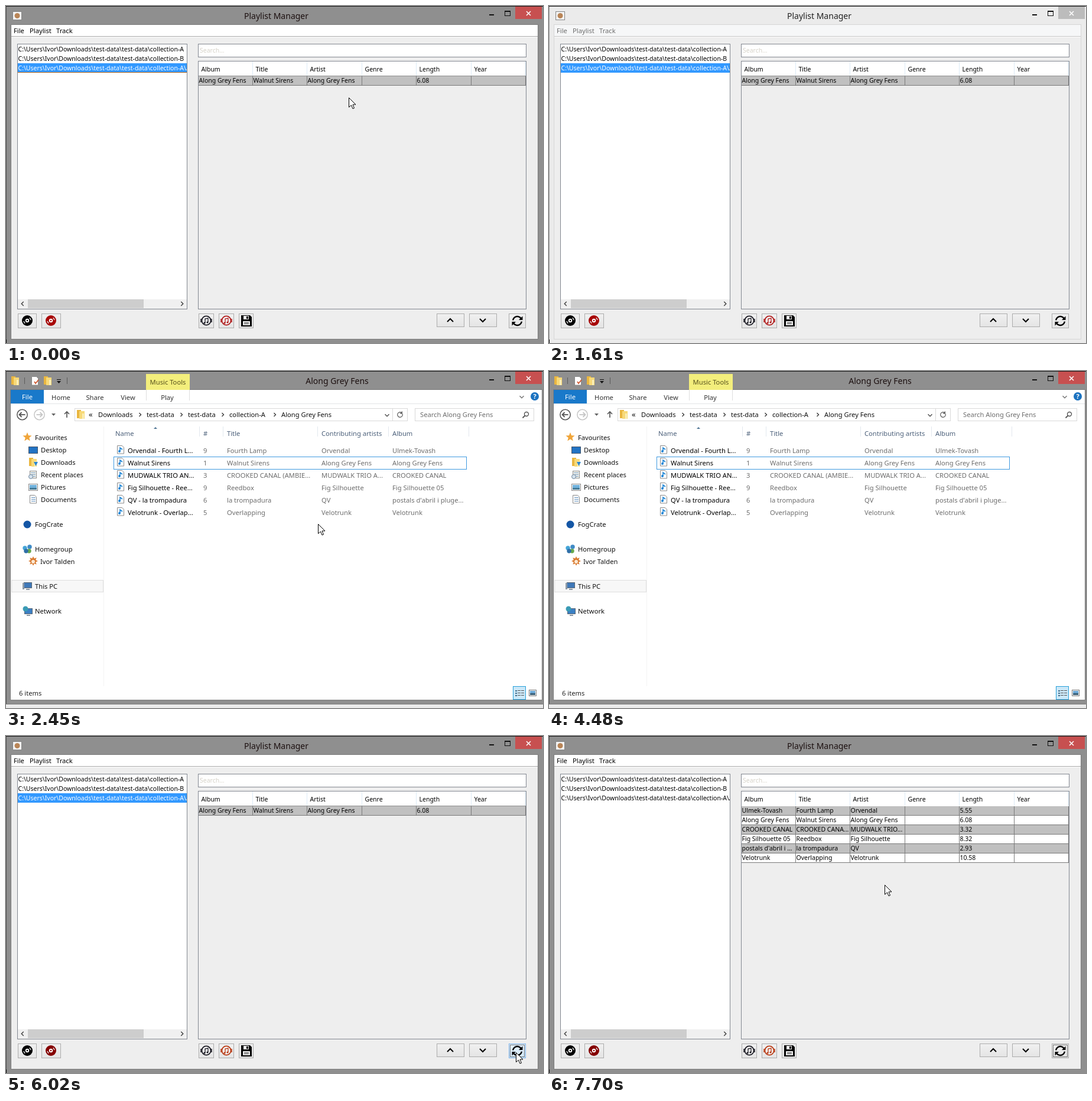
Animation, 909 px wide and 571 px high, one loop 7770 ms. Source, as an HTML page with a canvas:

```html
<!DOCTYPE html>
<html lang="en">
<head>
<meta charset="utf-8">
<title>Playlist Manager</title>
<style>
html, body { margin: 0; width: 100%; height: 100%; overflow: hidden; background: #8f8f8f; }
canvas { display: block; }
</style>
</head>
<body>
<canvas id="stage" width="909" height="571"></canvas>
<script>
const ctx = document.getElementById('stage').getContext('2d');
const LOOP = 7770, STEP = 70;
const SANS = '"Noto Sans", "Open Sans", sans-serif';
const SMALL = '10.5px ' + SANS, UI = '11.2px ' + SANS, TITLE = '14px ' + SANS;

const FOLDER = 'Along Grey Fens';
const TRACKS = [
  { file: 'Orvendal - Fourth Lamp', no: 9, title: 'Fourth Lamp', artist: 'Orvendal', album: 'Ulmek-Tovash', length: '5.55' },
  { file: 'Walnut Sirens', no: 1, title: 'Walnut Sirens', artist: FOLDER, album: FOLDER, length: '6.08' },
  { file: 'MUDWALK TRIO AND GUESTS', no: 3, title: 'CROOKED CANAL (AMBIENT SIDE)', artist: 'MUDWALK TRIO AND GUESTS', album: 'CROOKED CANAL', length: '3.32' },
  { file: 'Fig Silhouette - Reedbox', no: 9, title: 'Reedbox', artist: 'Fig Silhouette', album: 'Fig Silhouette 05', length: '8.32' },
  { file: 'QV - la trompadura', no: 6, title: 'la trompadura', artist: 'QV', album: "postals d'abril i pluges de tardor", length: '2.93' },
  { file: 'Velotrunk - Overlapping', no: 5, title: 'Overlapping', artist: 'Velotrunk', album: 'Velotrunk', length: '10.58' }
];

// Each run: pointer keys [time, x, y], visible until `end`.
const POINTER = [
  { end: 700, keys: [[0, 580, 155], [490, 580, 155], [560, 604, 163], [630, 672, 196]] },
  { end: 3080, keys: [[1890, 655, 358], [1960, 606, 322], [2030, 564, 290], [2100, 538, 268], [2170, 528, 259], [2870, 528, 259], [2940, 556, 260], [3010, 629, 263]] },
  { end: LOOP, keys: [[4900, 902, 380], [5110, 868, 444], [5320, 842, 508], [5530, 863, 536], [6510, 863, 536], [6580, 857, 528],
    [6720, 831, 487], [6930, 742, 420], [7140, 640, 350], [7350, 569, 307], [7560, 569, 268], [7700, 568, 252]] }
];

function rect(x, y, w, h, fill, stroke) {
  if (fill) { ctx.fillStyle = fill; ctx.fillRect(x, y, w, h); }
  if (stroke) { ctx.strokeStyle = stroke; ctx.lineWidth = 1; ctx.strokeRect(x + .5, y + .5, w - 1, h - 1); }
}
function line(points, color, width = 1) {
  ctx.beginPath();
  points.forEach(([x, y]) => ctx.lineTo(x, y));
  ctx.strokeStyle = color; ctx.lineWidth = width; ctx.stroke();
}
function poly(points, fill, stroke) {
  ctx.beginPath();
  points.forEach(([x, y]) => ctx.lineTo(x, y));
  ctx.closePath();
  if (fill) { ctx.fillStyle = fill; ctx.fill(); }
  if (stroke) { ctx.strokeStyle = stroke; ctx.lineWidth = 1; ctx.stroke(); }
}
function circle(x, y, r, fill, stroke, width = 1) {
  ctx.beginPath(); ctx.arc(x, y, r, 0, 7);
  if (fill) { ctx.fillStyle = fill; ctx.fill(); }
  if (stroke) { ctx.strokeStyle = stroke; ctx.lineWidth = width; ctx.stroke(); }
}
function text(str, x, y, color = '#000', font = UI, align = 'left') {
  ctx.font = font; ctx.fillStyle = color; ctx.textAlign = align;
  ctx.fillText(str, x, y);
}
function fitted(str, x, y, width, color, font) {
  ctx.font = font;
  let s = str;
  for (let n = str.length; ctx.measureText(s).width > width; n--) s = str.slice(0, n - 1) + '...';
  text(s, x, y, color, font);
}
// dir: 'l', 'r', 'u' or 'd'
function chevron(x, y, size, dir, color, width = 1.5) {
  const h = size / 2, s = dir === 'l' || dir === 'u' ? 1 : -1;
  const side = dir === 'l' || dir === 'r';
  line([-1, 0, 1].map(k => {
    const off = (k ? h : -h) * s, across = k * size;
    return side ? [x + off, y + across] : [x + across, y + off];
  }), color, width);
}

function frame(title, titleX, active) {
  rect(0, 0, 909, 571, active ? '#8f8f8f' : '#ebebeb');
  rect(0, 0, 909, 1, '#151515');
  rect(0, 1, 1, 565, active ? '#4e4e4e' : '#a0a0a0');
  text(title, titleX, 22, active ? '#1c1010' : '#222', TITLE, 'center');
  rect(818, 14, 8, 2, '#111');
  rect(844, 8, 10, 9, null, '#111');
  rect(844, 8, 10, 2, '#111');
  rect(862, 1, 45, 21, active ? '#c75050' : '#bcbcbc');
  line([[881, 9], [888, 16]], '#fff', 1.6);
  line([[888, 9], [881, 16]], '#fff', 1.6);
}

function button(x, w, h, hover, focus) {
  const g = ctx.createLinearGradient(0, 521, 0, 521 + h);
  g.addColorStop(0, hover ? '#e6f2fc' : '#f1f1f1');
  g.addColorStop(1, hover ? '#d2e8fa' : '#e4e4e4');
  rect(x, 521, w, h, g, hover ? '#7eb4ea' : '#acacac');
  if (focus) {
    ctx.setLineDash([1, 1]);
    rect(x + 2, 523, w - 4, h - 4, null, '#000');
    ctx.setLineDash([]);
  }
}
function disc(x, color) {
  circle(x, 533, 9, color);
  for (const a of [-.9, 2.25]) {
    ctx.beginPath(); ctx.arc(x, 533, 6, a, a + .75);
    ctx.strokeStyle = '#ddd'; ctx.lineWidth = 1.5; ctx.stroke();
  }
  circle(x, 533, 3.2, '#fff');
  circle(x, 533, 1.3, color);
}
function noteBadge(x, color) {
  circle(x, 533, 7.6, '#f4f4f4', color, 1.8);
  for (const s of [-1, 1]) line([[x + s * 9, 530], [x + s * 9, 536]], color, 1.5);
  line([[x - 2, 537], [x - 2, 530], [x + 3, 529], [x + 3, 536]], color, 1.3);
  circle(x - 3, 537, 1.6, color);
  circle(x + 2, 536, 1.6, color);
}
function floppy() {
  poly([[398, 524], [413, 524], [416, 527], [416, 543], [398, 543]], '#000');
  rect(402, 525, 9, 6, '#eee');
  rect(407, 526, 3, 4, '#000');
  rect(401, 534, 12, 7, '#eee');
  rect(403, 536, 8, 1, '#444');
  rect(403, 538, 8, 1, '#444');
}
function refreshIcon() {
  for (const turn of [0, Math.PI]) {
    ctx.save();
    ctx.translate(865.5, 533.5); ctx.rotate(turn);
    ctx.beginPath(); ctx.arc(0, 0, 7.5, Math.PI + .15, -.55);
    ctx.strokeStyle = '#000'; ctx.lineWidth = 2.4; ctx.stroke();
    poly([[9, -8], [9, -1.5], [2.5, -1.5]], '#000');
    ctx.restore();
  }
}

function drawPlayer(t) {
  const active = t < 1610 || t >= 1680;
  const later = t >= 4550, clicked = t >= 5950, loaded = t >= 6160;
  frame('Playlist Manager', 457.5, active);
  rect(8, 31, 893, 534, null, active ? '#7c7c7c' : '#d6d6d6');
  rect(9, 32, 891, 532, '#eee');
  rect(0, 565, 1, 6, '#000');
  rect(11, 9, 16, 15, '#f4f4f4', '#858585');
  circle(19, 16.5, 4.5, '#b98557');

  rect(9, 32, 891, 19, active ? '#fff' : '#f6f7f8');
  rect(9, 51, 891, 1, active ? '#a7a7a7' : '#c4c4c4');
  rect(9, 52, 891, 1, '#fff');
  [['File', 13], ['Playlist', 40], ['Track', 85]].forEach(([s, x]) => text(s, x, 46, active ? '#000' : '#6d6d6d', UI));

  rect(19, 64, 288, 450, '#fff', '#828790');
  if (!loaded) {
    rect(20, 97, 286, 16, '#3399ff');
    if (active && !clicked) rect(20, 112, 286, 1, '#bd6a16');
  }
  ctx.save();
  ctx.beginPath(); ctx.rect(20, 65, 286, 48); ctx.clip();
  ['A', 'B', 'A\\' + FOLDER].forEach((end, i) =>
    text('C:\\Users\\Ivor\\Downloads\\test-data\\test-data\\collection-' + end, 20.5, 77 + 16 * i, i === 2 && !loaded ? '#fff' : '#000', SMALL));
  ctx.restore();
  rect(20, 497, 286, 16, '#f0f0f0');
  rect(37, 497, 196, 15, '#cdcdcd');
  chevron(28, 504.5, 3.5, 'l', '#444');
  chevron(298, 504.5, 3.5, 'r', '#444');

  rect(325, 64, 556, 23, '#fff', '#828790');
  text('Search...', 328, 79, '#d6d2c8', SMALL);

  rect(325, 93, 556, 421, '#eee', '#828790');
  rect(326, 94, 554, 25, '#fff');
  const edges = [325, 417, 509, 602, 694, 787, 879];
  ['Album', 'Title', 'Artist', 'Genre', 'Length', 'Year'].forEach((s, i) => {
    text(s, edges[i] + 5.5, 111, '#000', SMALL);
    rect(edges[i + 1], 94, 1, 24, '#dceaf6');
  });
  (loaded ? TRACKS : [TRACKS[1]]).forEach((track, row) => {
    const y = 119 + row * 16;
    rect(326, y, 554, 16, row % 2 ? '#fff' : '#c0c0c0');
    rect(326, y + 15, 554, 1, '#7a7a7a');
    edges.slice(1).forEach(x => rect(x, y, 1, 16, '#7a7a7a'));
    [track.album, track.title, track.artist, '', track.length].forEach((s, i) => fitted(s, edges[i] + 1.5, y + 11, 90, '#000', SMALL));
  });
  if (!loaded) rect(326, 118, 554, 1, '#909090');

  button(20, 32, 25); disc(36, '#000');
  button(60, 33, 25); disc(76, later ? '#850000' : '#a80808');
  button(326, 26, 25); noteBadge(339, '#1a1a22');
  button(360, 26, 25); noteBadge(373, later ? '#b83a14' : '#b01c1c');
  button(394, 25, 25); floppy();
  button(729, 47, 23); chevron(752, 532.5, 5, 'u', '#000', 2);
  button(784, 47, 23); chevron(807, 532.5, 5, 'd', '#000', 2);
  button(851, 29, 25, t >= 5460 && t < 7490, clicked);
  refreshIcon();
}

function folder(x, y) {
  rect(x, y, 7, 14, '#e9b640');
  rect(x + 4, y + 2, 9, 13, '#f7d978');
  rect(x + 9, y + 6, 3, 9, '#fbeeb8');
}
function page(x, y, h = 15) {
  poly([[x + .5, y + .5], [x + 8.5, y + .5], [x + 11.5, y + 3.5], [x + 11.5, y + h], [x + .5, y + h]], '#fff', '#8a8a8a');
}
function star(x, y, points, outer, inner, fill) {
  poly(Array.from({ length: points * 2 }, (_, i) => {
    const a = i * Math.PI / points - Math.PI / 2, r = i % 2 ? inner : outer;
    return [x + r * Math.cos(a), y + r * Math.sin(a)];
  }), fill);
}
function monitor(x, y, screen) {
  rect(x, y, 14, 10, screen, '#5a6672');
  rect(x + 4, y + 11, 6, 2, '#8a96a2');
}

function drawSidebar() {
  rect(9, 354, 156, 21, '#f7f7f7', '#dedede');
  rect(165, 94, 1, 440, '#f4f4f4');
  const items = [['Favourites', 49, 113], ['Desktop', 59, 134], ['Downloads', 59, 155], ['Recent places', 59, 176], ['Pictures', 59, 197],
    ['Documents', 59, 218], ['FogCrate', 49, 260], ['Homegroup', 49, 302], ['Ivor Talden', 58, 323], ['This PC', 49, 365], ['Network', 49, 407]];
  items.forEach(([s, x, y]) => text(s, x, y + 4, '#111'));
  star(36, 112, 5, 8, 3.5, '#f0a53a');
  rect(38, 128, 16, 12, '#2273c4', '#44546a');
  folder(39, 147);
  poly([[47, 154], [54, 154], [50.5, 161]], '#2a85d0');
  rect(40, 169, 12, 13, '#f2f2ec', '#8d8d8d');
  for (const y of [172, 175, 178]) rect(42, y, 8, 1, '#739ac0');
  circle(42, 179, 3.5, '#d5e3ef', '#71879c');
  rect(38, 191, 16, 12, '#fff', '#888');
  rect(40, 193, 12, 8, '#6fb1dc');
  rect(40, 198, 12, 3, '#467a96');
  page(40, 210, 14);
  for (const y of [214, 217, 220]) rect(43, y, 7, 1, '#5f8fbd');
  circle(36, 260, 6.5, '#1456a5');
  [[32, 300, '#45a5d8'], [40, 298, '#3f8ac6'], [39, 305, '#67a94c'], [34, 305, '#2f6fa8']].forEach(([x, y, c]) => circle(x, y, 3.7, c));
  star(46, 322, 8, 8, 4.5, '#d9782c');
  circle(46, 323, 3, '#fbe8d2');
  monitor(30, 358, '#3f78b8');
  rect(28, 359, 3, 11, '#8c9aa8');
  monitor(31, 402, '#3b7fc4');
  circle(33, 403, 4.5, '#3a9bb5');
}

function drawRow(track, row, focused) {
  const y = 139 + row * 21;
  page(188, y - 13, 14);
  line([[193, y - 3], [193, y - 9], [197, y - 6]], '#1b84d6', 1.6);
  circle(192, y - 3, 2, '#1b84d6');
  fitted(track.file, 206, y, 115, '#000', UI);
  fitted(String(track.no), 334, y, 30, '#6d6d6d', UI);
  fitted(track.title, 374, y, 144, '#6d6d6d', UI);
  fitted(track.artist, 534, y, 104, '#6d6d6d', UI);
  fitted(track.album, 654, y, 124, '#6d6d6d', UI);
  if (focused) rect(182, y - 15, 598, 22, null, '#3f9ae0');
}

function drawExplorer(t) {
  frame(FOLDER, 560.5, true);
  rect(0, 565, 909, 6, '#ebebeb');
  rect(0, 564, 909, 1, '#7c7c7c');
  rect(7, 31, 901, 527, null, '#7c7c7c');
  rect(8, 32, 899, 525, '#fff');

  folder(9, 9);
  rect(31, 11, 1, 11, '#5b5b5b');
  page(43, 9);
  line([[48, 18], [50, 21], [55, 15]], '#d0572f', 1.8);
  folder(64, 9);
  rect(86, 14, 7, 1, '#111');
  poly([[86, 17], [93, 17], [89.5, 21]], '#111');
  rect(103, 11, 1, 11, '#5b5b5b');
  rect(237, 5, 74, 27, '#f3ee7c');
  text('Music Tools', 274, 23, '#57511c', UI, 'center');

  rect(8, 32, 56, 23, '#1979ca');
  text('File', 36, 48, '#fff', UI, 'center');
  [['Home', 93], ['Share', 150.5], ['View', 206.5], ['Play', 273]].forEach(([s, x]) => text(s, x, 49, '#333', UI, 'center'));
  rect(237, 32, 1, 18, '#dedede');
  rect(310, 32, 1, 18, '#dedede');
  rect(8, 55, 899, 1, '#e3e4e6');
  chevron(873, 44, 3.5, 'd', '#777');
  circle(895, 43, 7, '#1b72c0');
  text('?', 895, 47, '#fff', 'bold 11px ' + SANS, 'center');

  for (const [x, color, s] of [[27.5, '#555', 1], [56.5, '#c6c6c6', -1]]) {
    circle(x, 74, 8.7, null, color, 1.5);
    line([[x - 5 * s, 74], [x + 5 * s, 74]], color, 1.8);
    line([[x - s, 70], [x - 5 * s, 74], [x - s, 78]], color, 1.8);
  }
  poly([[77, 72], [84, 72], [80.5, 76]], '#666');
  line([[103, 79], [103, 69]], '#555', 1.7);
  line([[99, 73], [103, 69], [107, 73]], '#555', 1.7);
  rect(116, 63, 564, 22, '#fff', '#d9d9d9');
  rect(654, 64, 1, 20, '#d9d9d9');
  folder(120, 66);
  text('«', 140, 78, '#111', '13px ' + SANS);
  [['Downloads', 156], ['test-data', 238], ['test-data', 308], ['collection-A', 378], [FOLDER, 466]].forEach(([s, x], i) => {
    text(s, x, 78, '#111');
    if (i) chevron(x - 11, 74, 3, 'r', '#333', 1.3);
  });
  chevron(645, 75, 3.5, 'd', '#555');
  ctx.beginPath(); ctx.arc(667, 74, 4.3, -.3, 5.2);
  ctx.strokeStyle = '#666'; ctx.lineWidth = 1.3; ctx.stroke();
  poly([[671, 68], [671, 73], [666, 72]], '#666');
  rect(692, 63, 202, 22, '#fff', '#d9d9d9');
  text('Search ' + FOLDER, 701, 78, '#6d6d6d');
  circle(881, 73, 3.5, null, '#555', 1.4);
  line([[878.5, 75.5], [874.5, 79.5]], '#555', 1.8);

  [['Name', 185], ['#', 334], ['Title', 374], ['Contributing artists', 534], ['Album', 654]].forEach(([s, x]) => text(s, x, 110, '#4c607a'));
  [327, 367, 527, 647, 783].forEach(x => rect(x, 94, 1, 17, '#e2e8ee'));
  poly([[250, 98], [256, 98], [253, 95]], '#4a7191');

  const pasted = t >= 2450;
  (pasted ? TRACKS : [TRACKS[1]]).forEach((track, row) => drawRow(track, row, track === TRACKS[1]));
  drawSidebar();

  text(pasted ? '6 items' : '1 item', 22, 550, '#222');
  rect(858, 534, 22, 23, '#cce8f8', '#26a0da');
  for (const y of [541, 545, 549]) {
    rect(862, y, 3, 2, '#46708c');
    rect(866, y, 5, 1, '#555');
    rect(872, y, 5, 1, '#555');
  }
  rect(885, 540, 13, 11, '#fff', '#777');
  rect(887, 542, 9, 5, '#6aa7d6');
  rect(887, 546, 9, 3, '#395e75');
}

function pointerAt(t) {
  const run = POINTER.find(r => t >= r.keys[0][0] && t < r.end);
  if (!run) return null;
  const next = run.keys.findIndex(k => k[0] > t);
  if (next < 0) return run.keys.at(-1).slice(1);
  const [a, b] = [run.keys[next - 1], run.keys[next]];
  const p = (t - a[0]) / (b[0] - a[0]);
  return [1, 2].map(i => Math.round(a[i] + (b[i] - a[i]) * p));
}
function drawPointer([x, y]) {
  const shape = [[0, 0], [0, 16], [4, 12.5], [6.5, 18.5], [9, 17.5], [6.5, 11.5], [11.5, 11.5]];
  poly(shape.map(([dx, dy]) => [x + dx + .5, y + dy + .5]), '#fff', '#000');
}

function render(now) {
  const t = Math.floor(now % LOOP / STEP) * STEP;
  if (t >= 1680 && t < 4550) drawExplorer(t);
  else drawPlayer(t);
  const tip = pointerAt(t);
  if (tip) drawPointer(tip);
  requestAnimationFrame(render);
}
render(performance.now());
</script>
</body>
</html>
```
